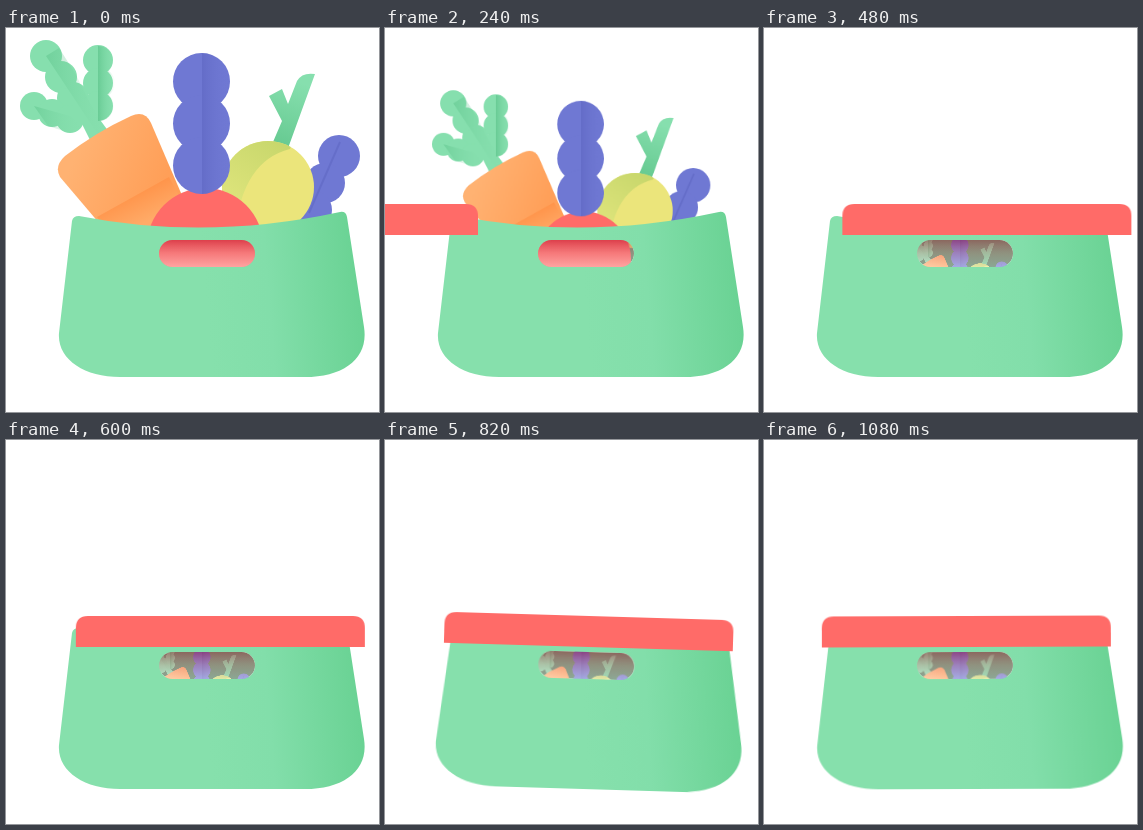
Write an HTML page that moves like this. It is 373 px wide and 384 px high and loops after 1.12 s.

```html
<!DOCTYPE html>
<html lang="en">
<head>
<meta charset="utf-8">
<title>Grocery bag</title>
<style>
  html, body { margin: 0; width: 100%; height: 100%; overflow: hidden; background: #fff; }
  svg { display: block; width: 100vw; height: 100vh; }
  .veg, .lid, .bag { animation: 1120ms linear infinite; }
  .veg { animation-name: drop; transform-origin: 196px 289px; }
  .lid { animation-name: slide; }
  .bag { animation-name: wiggle; transform-origin: 203px 235px; }

  @keyframes drop {
    0% { transform: scale(1); }
    8.93% { transform: scale(.923); }
    21.43% { transform: scale(.82); }
    26.79% { transform: scale(.74); }
    32.14% { transform: scale(.6); }
    37.5% { transform: scale(.42); }
    42.86%, 100% { transform: scale(.305); }
  }
  @keyframes slide {
    0% { transform: translateX(-366px); }
    8.93% { transform: translateX(-332px); }
    21.43% { transform: translateX(-255px); }
    26.79% { transform: translateX(-203px); }
    32.14% { transform: translateX(-124px); }
    37.5% { transform: translateX(-38px); }
    42.86% { transform: translateX(20px); animation-timing-function: ease-out; }
    45.54% { transform: translateX(27px); animation-timing-function: ease-in-out; }
    60.71%, 100% { transform: translateX(0); }
  }
  @keyframes wiggle {
    0%, 60.71% { transform: rotate(0); animation-timing-function: ease-in-out; }
    67.86% { transform: rotate(-2.7deg); animation-timing-function: ease-in-out; }
    75% { transform: rotate(2.3deg); animation-timing-function: ease-in-out; }
    82.14% { transform: rotate(-2deg); animation-timing-function: ease-in-out; }
    89.29% { transform: rotate(1.2deg); animation-timing-function: ease-in-out; }
    96.43%, 100% { transform: rotate(-.2deg); }
  }
</style>
</head>
<body>
<svg viewBox="0 0 373 384" preserveAspectRatio="none">
  <defs>
    <linearGradient id="bagFill" gradientUnits="userSpaceOnUse" x1="200" y1="275" x2="357" y2="262">
      <stop offset="0" stop-color="#86e0ac"/>
      <stop offset=".4" stop-color="#82deaa"/>
      <stop offset="1" stop-color="#69d293"/>
    </linearGradient>
    <linearGradient id="inside" x2="0" y2="1">
      <stop offset="0" stop-color="#6bb38b"/>
      <stop offset="1" stop-color="#467253"/>
    </linearGradient>
    <linearGradient id="shade" x2="0" y2="1">
      <stop offset="0" stop-color="#b20a28" stop-opacity=".45"/>
      <stop offset=".5" stop-color="#e8939b" stop-opacity=".38"/>
      <stop offset="1" stop-color="#fff" stop-opacity=".38"/>
    </linearGradient>
    <linearGradient id="carrot" gradientUnits="userSpaceOnUse" x1="70" y1="125" x2="155" y2="160">
      <stop offset="0" stop-color="#ffb272"/>
      <stop offset="1" stop-color="#ff9f58"/>
    </linearGradient>
    <linearGradient id="facet" gradientUnits="userSpaceOnUse" x1="124" y1="165" x2="138" y2="195">
      <stop offset="0" stop-color="#ff9349"/>
      <stop offset="1" stop-color="#ffab68"/>
    </linearGradient>
    <linearGradient id="stalk" gradientUnits="userSpaceOnUse" x1="273" y1="120" x2="295" y2="55">
      <stop offset="0" stop-color="#65c990"/>
      <stop offset="1" stop-color="#86dfae"/>
    </linearGradient>
    <linearGradient id="yellowSide" gradientUnits="userSpaceOnUse" x1="270" y1="112" x2="225" y2="180">
      <stop offset="0" stop-color="#c8d76c"/>
      <stop offset="1" stop-color="#dfe57c"/>
    </linearGradient>
    <linearGradient id="crease">
      <stop offset="0" stop-color="#5961bd" stop-opacity=".5"/>
      <stop offset="1" stop-color="#6f78d3" stop-opacity="0"/>
    </linearGradient>
    <linearGradient id="leafShade">
      <stop offset="0" stop-color="#55be84" stop-opacity=".6"/>
      <stop offset="1" stop-color="#84dcab" stop-opacity="0"/>
    </linearGradient>
    <clipPath id="yellowClip"><circle cx="262" cy="159" r="46"/></clipPath>
  </defs>

  <g class="bag">
    <rect x="153" y="212" width="96" height="27" rx="13.5" fill="url(#inside)"/>

    <g class="veg">
      <g fill="#86dfae">
        <circle cx="40" cy="28" r="16"/><circle cx="55" cy="49" r="16"/><circle cx="67" cy="70" r="16"/>
        <circle cx="92" cy="32" r="15"/><circle cx="92" cy="55" r="15"/><circle cx="92" cy="78" r="15"/>
        <circle cx="28" cy="78" r="14"/><circle cx="46" cy="85" r="14"/><circle cx="64" cy="91" r="14"/>
        <path d="M58 60 L72 62 L103 104 L86 116Z"/>
      </g>
      <path d="M40 28 L53 20 L69 45 L84 75 L101 103 L93 108Z" fill="url(#leafShade)" opacity=".7"/>
      <path d="M92 18 A15 15 0 0 1 103 43 A15 15 0 0 1 103 67 A15 15 0 0 1 92 93Z" fill="url(#leafShade)"/>
      <path d="M28 78 L64 88 L76 99 L64 105 L42 98Z" fill="url(#leafShade)" opacity=".7"/>

      <path d="M54 149 Q48 138 59 128 Q90 104 125 88 Q139 82 145 95 L190 200 L110 215Z" fill="url(#carrot)"/>
      <path d="M91 189 L163 149 L190 200 L110 215Z" fill="url(#facet)"/>

      <g fill="#6f78d3">
        <circle cx="333" cy="128" r="21"/><circle cx="319" cy="155" r="20"/><circle cx="306" cy="182" r="20"/>
      </g>
      <path d="M334 114 L303 185" stroke="#626ac6" stroke-width="2" opacity=".7"/>

      <path d="M267 114 L276 93 L263 68 L276 61 L282 76 L291 53 Q296 44 309 46 L281 123Z" fill="url(#stalk)"/>
      <circle cx="262" cy="159" r="46" fill="#ebe57b"/>
      <path d="M284 121 Q236 133 229 205 L205 205 V105 H290Z" fill="url(#yellowSide)" clip-path="url(#yellowClip)"/>

      <circle cx="199" cy="218" r="58" fill="#ff6b68"/>

      <g fill="#6f78d3">
        <circle cx="195.5" cy="53.5" r="28.5"/><circle cx="195.5" cy="95.5" r="28.5"/><circle cx="195.5" cy="137.5" r="28.5"/>
      </g>
      <path d="M196 25 A28.5 28.5 0 0 1 215 74.5 A28.5 28.5 0 0 1 215 116.5 A28.5 28.5 0 0 1 196 166Z" fill="url(#crease)"/>
    </g>

    <path fill="url(#bagFill)" fill-rule="evenodd" d="M66 193 Q67 188 73 188 Q200 213 334 184 Q340 183 341 189
      L358 299 C363 330 338 349 299 349 H114 C78 349 51 331 53 305Z
      M166.5 212 A13.5 13.5 0 0 0 166.5 239 H235.5 A13.5 13.5 0 0 0 235.5 212Z"/>
    <rect x="153" y="212" width="96" height="27" rx="13.5" fill="url(#shade)"/>

    <path class="lid" d="M58 207 V188 Q58 176 70 176 H335 Q347 176 347 188 V207Z" fill="#ff6b68"/>
  </g>
</svg>
</body>
</html>
```
